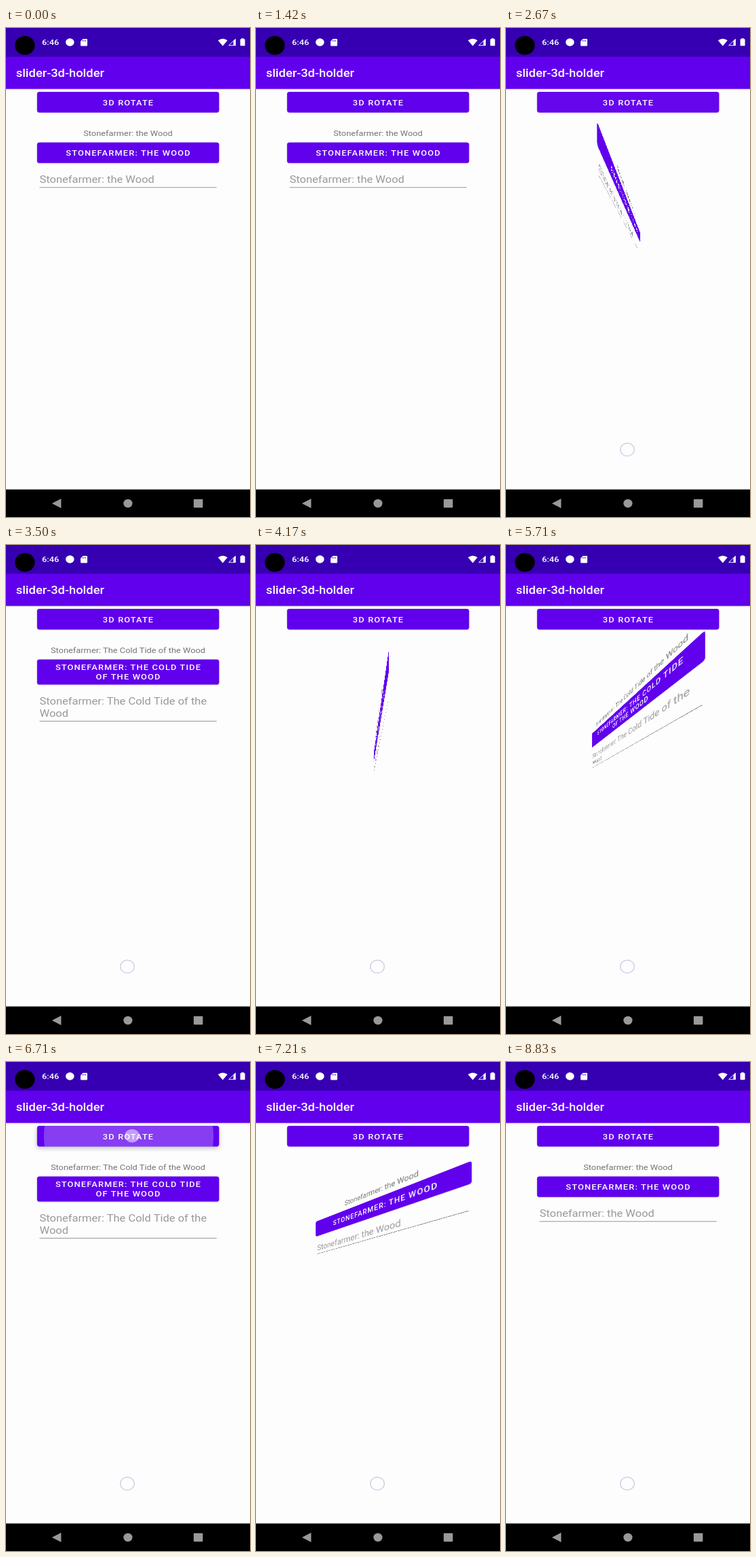
These frames come from a looping animation (360 px wide and 720 px high, 8910 ms). An HTML page:

```html
<!DOCTYPE html>
<html lang="en">
<head>
<meta charset="utf-8">
<title>Panel flip</title>
<style>
html, body { margin: 0; width: 100%; height: 100%; overflow: hidden; background: #fdfdfd; }
#stage { position: relative; width: 360px; height: 720px; overflow: hidden; background: #fdfdfd; }
/* Phone screen in density-independent units, squeezed onto the stage */
#screen {
  position: absolute; left: 0; top: 0; width: 392.73px; height: 850.91px;
  transform: scale(.91667, .84615); transform-origin: 0 0;
  font: 14px/16.4px Roboto, "Noto Sans", sans-serif;
}
#screen div { position: absolute; box-sizing: border-box; white-space: nowrap; }
#bar { left: 0; top: 0; width: 100%; height: 106.1px; background: #6100ed; box-shadow: 0 1px 2px rgba(0,0,0,.12); }
#status { left: 0; top: 0; width: 100%; height: 49.6px; background: #3600b2; }
#clock { left: 57.8px; top: 17.3px; color: #fff; font-weight: 500; }
#title { left: 16px; top: 66.9px; color: #fff; font-size: 20px; line-height: 23.4px; font-weight: 500; }
#nav { left: 0; bottom: 0; width: 100%; height: 48px; background: #000; }
#screen .button {
  display: flex; align-items: center; justify-content: center; text-align: center;
  width: 292.73px; height: 36px; padding: 1.4px 0 0 1.25px; border-radius: 4px;
  background: #6100ed; color: #fff; font-weight: 500;
  letter-spacing: 1.25px; text-transform: uppercase;
  box-shadow: 0 1px 2px rgba(0,0,0,.16);
}
#rotate { left: 50px; top: 111.45px; overflow: hidden; }
#ripple, #touch { border-radius: 50%; background: #fff; opacity: 0; }
#touch { left: 191.2px; top: 117px; width: 23.4px; height: 23.4px; }
#panel { left: 50px; top: 173.45px; width: 292.73px; height: 629.46px; }
#label { left: 0; top: 1.8px; width: 100%; text-align: center; color: #757575; }
#action { left: 0; top: 25.2px; }
#field { left: 0; top: 67px; width: 100%; }
#hint { left: 4px; top: 12.3px; font-size: 18px; line-height: 21.1px; color: #999; }
#line { left: 4px; right: 4px; top: 36.2px; height: 1px; background: #858585; }
#panel.long #action { height: 44.3px; }
#panel.long #field { top: 75.3px; }
#panel.long #line { top: 57.3px; }
svg { position: absolute; left: 0; top: 0; }
</style>
</head>
<body>
<div id="stage">
  <div id="screen">
    <div id="panel">
      <div id="label"></div>
      <div id="action" class="button"></div>
      <div id="field"><div id="hint"></div><div id="line"></div></div>
    </div>
    <div id="bar"></div>
    <div id="status"></div>
    <div id="clock">6:46</div>
    <div id="title">slider-3d-holder</div>
    <div id="rotate" class="button">3D rotate<div id="ripple"></div></div>
    <div id="touch"></div>
    <div id="nav"></div>
  </div>
  <svg width="360" height="720" viewBox="0 0 360 720">
    <ellipse cx="27.8" cy="25.6" rx="14.8" ry="13.9"/>
    <g fill="#fff">
      <ellipse cx="94.3" cy="21" rx="6.3" ry="5.8"/>
      <path d="M113.5 16H119q1 0 1 1v8.500q0 1-1 1h-8q-1 0-1-1V19.500z"/>
      <path d="M312.800 18.300q7-5 14 0L319.800 26.400z"/>
      <path d="M335.500 19V26H338.800V16z"/>
      <path d="M328.700 25.600L338.400 16.400V25.600z" fill="none" stroke="#fff" stroke-width=".9"/>
      <path d="M347.400 15.200h3.400v1h1q.8 0 .8.800v8.500q0 .8-.8.800h-5.400q-.8 0-.8-.8V17q0-.8.800-.8h1z"/>
    </g>
    <path d="M113 17.800v2M115.200 17.800v2M117.400 17.800v2" stroke="#3600b2" stroke-width=".9"/>
    <g fill="#999">
      <path d="M67.800 700L81.400 693V707z"/>
      <ellipse cx="179.900" cy="700" rx="6.600" ry="6.200"/>
      <rect x="276.900" y="693.800" width="13.500" height="12.400" rx="1"/>
    </g>
    <ellipse id="ring" cx="179" cy="620.700" rx="10.300" ry="9.500" fill="none" stroke="#d3cfe8" stroke-width="1.400"/>
  </svg>
</div>
<script>
const LOOP = 8910, HALF = 300, PRESS = 110, RING_AT = 1750;
const FLIPS = [2402, 3860, 5320, 6750];
const EYE = 576 / 2.75, DEPTH = 400 / 2.75;
const TEXTS = {
  short: ["Stonefarmer: the Wood", "Stonefarmer: the Wood", "Stonefarmer: the Wood"],
  long: [
    "Stonefarmer: The Cold Tide of the Wood",
    "Stonefarmer: The Cold Tide<br>of the Wood",
    "Stonefarmer: The Cold Tide of the<br>Wood"
  ]
};

const $ = id => document.getElementById(id);
const panel = $("panel"), rotate = $("rotate"), ripple = $("ripple");
const clamp = v => Math.max(0, Math.min(1, v));
const mix = (a, b, k) => a + (b - a) * k;
let state = "";

function setText(next) {
  if (next === state) return;
  state = next;
  panel.className = next;
  ["label", "action", "hint"].forEach((id, i) => { $(id).innerHTML = TEXTS[next][i]; });
}

// Signed share of a quarter turn: speeds up to +1, then slows from -1 to 0
function turnAt(t) {
  const start = FLIPS.find(f => t >= f && t < f + 2 * HALF);
  if (start === undefined) return 0;
  const p = (t - start) / HALF;
  return p < 1 ? p * p : -((2 - p) ** 2);
}

function drawPanel(t) {
  const turn = turnAt(t);
  const flipped = FLIPS.filter(f => t >= f + HALF).length;
  setText(flipped % 2 ? "long" : "short");
  panel.style.transform = turn
    ? `perspective(${EYE}px) translateZ(${-DEPTH * Math.abs(turn)}px) rotateY(${90 * turn}deg)`
    : "none";
}

function drawPress(t) {
  const start = FLIPS.find(f => t >= f - PRESS && t < f + 400);
  const age = start === undefined ? 0 : t - start + PRESS;
  const held = clamp(age / 60) * (start === undefined ? 0 : 1 - clamp((t - start) / 300));
  const grow = 1 - (1 - clamp(age / 150)) ** 3;
  const r = mix(44, 152, grow);
  const x = mix(152.9, 146.36, grow), y = 18;
  Object.assign(ripple.style, {
    left: x - r + "px", top: y - r + "px",
    width: 2 * r + "px", height: 2 * r + "px",
    opacity: 0.24 * held
  });
  rotate.style.boxShadow = `0 ${mix(1, 3, held)}px ${mix(2, 8, held)}px rgba(0,0,0,${mix(0.16, 0.24, held)})`;
  $("touch").style.opacity = age > 0 && age < PRESS + 30 ? 0.5 : 0;
}

function frame() {
  const t = performance.now() % LOOP;
  drawPanel(t);
  drawPress(t);
  $("ring").style.opacity = t >= RING_AT ? 1 : 0;
  requestAnimationFrame(frame);
}
frame();
</script>
</body>
</html>
```
